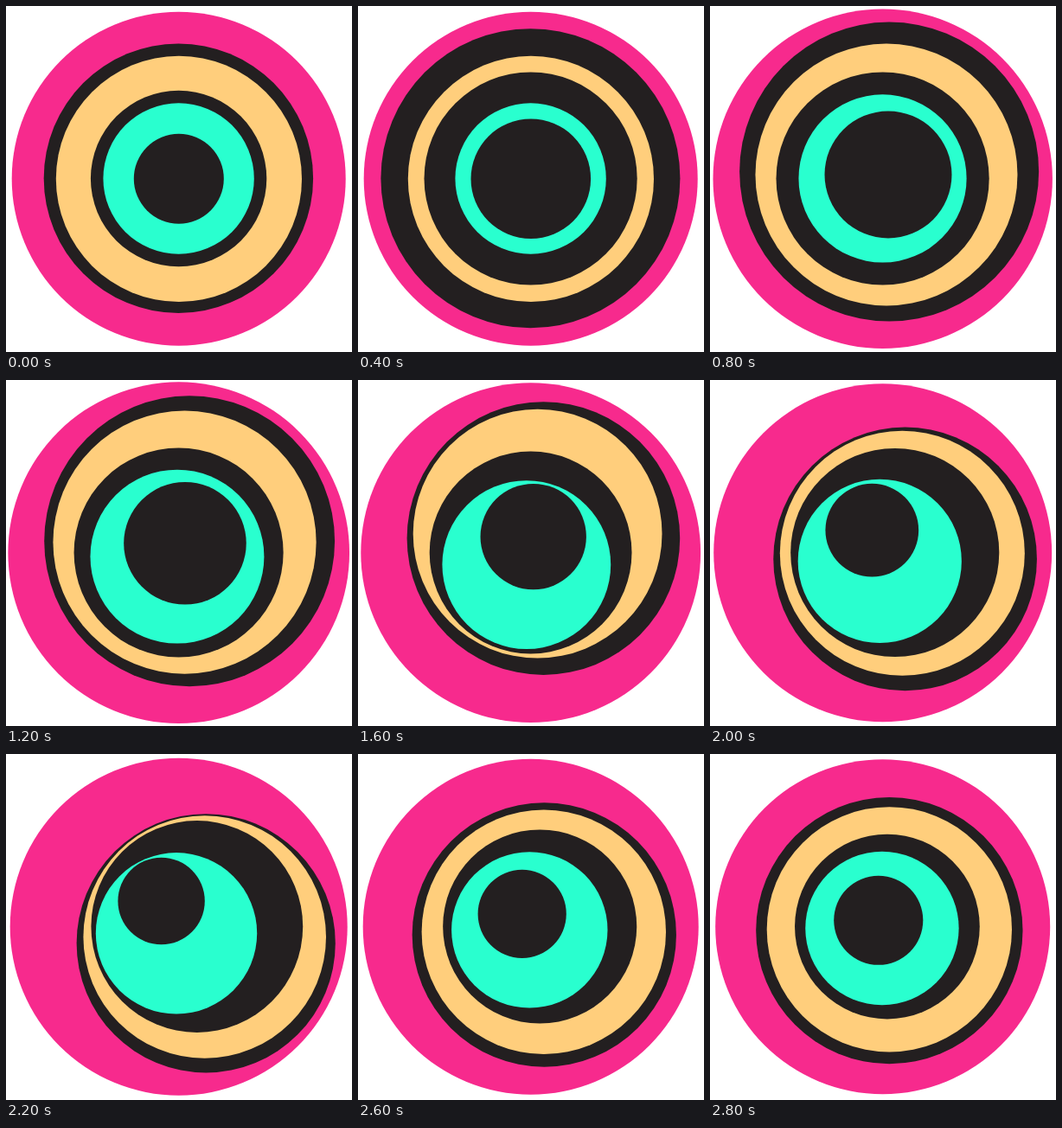
These frames come from a looping animation (400 px wide and 400 px high, 3 s). An HTML page:

```html
<!DOCTYPE html>
<html lang="en">
<head>
<meta charset="utf-8">
<title>Circles</title>
<style>
  html, body { margin: 0; width: 100%; height: 100%; overflow: hidden; background: #fff; }
  svg { display: block; width: 100%; height: 100%; }

  circle { fill: #231f20; animation: 3s infinite; }
  .pink { fill: #f72a8d; animation-name: pink; }
  .yellow { fill: #ffce7c; animation-name: yellow; }
  .teal { fill: #29ffcf; animation-name: teal; }
  .outer { animation-name: outer; }
  .middle { animation-name: middle; }
  .pupil { animation-name: pupil; }

  /* Every segment advances in 200 ms steps. */
  @keyframes pink {
    0% { cx: 199.7px; cy: 199.7px; r: 193px; animation-timing-function: steps(2); }
    13.3333% { cx: 199.7px; cy: 199.7px; r: 193px; animation-timing-function: steps(3); }
    33.3333% { cx: 199.7px; cy: 199.7px; r: 197.8px; animation-timing-function: steps(3); }
    53.3333% { cx: 199.7px; cy: 199.7px; r: 196.4px; animation-timing-function: steps(3); }
    73.3333% { cx: 199.7px; cy: 199.7px; r: 195px; animation-timing-function: steps(4); }
    100% { cx: 199.7px; cy: 199.7px; r: 193px; }
  }
  @keyframes outer {
    0% { cx: 199.4px; cy: 199.2px; r: 155.7px; animation-timing-function: steps(2); }
    13.3333% { cx: 199.4px; cy: 199.2px; r: 173px; animation-timing-function: steps(3); }
    33.3333% { cx: 211px; cy: 187.8px; r: 173px; animation-timing-function: steps(3); }
    53.3333% { cx: 214.4px; cy: 183.1px; r: 157.8px; animation-timing-function: steps(3); }
    73.3333% { cx: 231.2px; cy: 218.8px; r: 149.6px; animation-timing-function: steps(4); }
    100% { cx: 199.4px; cy: 199.2px; r: 155.7px; }
  }
  @keyframes yellow {
    0% { cx: 199.9px; cy: 199.9px; r: 142.1px; animation-timing-function: steps(2); }
    13.3333% { cx: 199.9px; cy: 199.9px; r: 142.1px; animation-timing-function: steps(3); }
    33.3333% { cx: 206px; cy: 192.5px; r: 156.2px; animation-timing-function: steps(3); }
    53.3333% { cx: 207.6px; cy: 177.7px; r: 143.9px; animation-timing-function: steps(3); }
    73.3333% { cx: 229.7px; cy: 211.5px; r: 140.3px; animation-timing-function: steps(4); }
    100% { cx: 199.9px; cy: 199.9px; r: 142.1px; }
  }
  @keyframes middle {
    0% { cx: 199.6px; cy: 199.5px; r: 101.7px; animation-timing-function: steps(2); }
    13.3333% { cx: 199.6px; cy: 199.5px; r: 123.1px; animation-timing-function: steps(3); }
    33.3333% { cx: 199.6px; cy: 199.5px; r: 123.1px; animation-timing-function: steps(3); }
    53.3333% { cx: 199.6px; cy: 199.5px; r: 116.9px; animation-timing-function: steps(3); }
    73.3333% { cx: 220.8px; cy: 199.5px; r: 122.4px; animation-timing-function: steps(4); }
    100% { cx: 199.6px; cy: 199.5px; r: 101.7px; }
  }
  @keyframes teal {
    0% { cx: 199.6px; cy: 199.5px; r: 87.2px; animation-timing-function: steps(2); }
    13.3333% { cx: 199.6px; cy: 199.5px; r: 87.2px; animation-timing-function: steps(3); }
    33.3333% { cx: 199.5px; cy: 199.4px; r: 102px; animation-timing-function: steps(3); }
    53.3333% { cx: 194.8px; cy: 213.6px; r: 97.4px; animation-timing-function: steps(3); }
    73.3333% { cx: 197px; cy: 207.3px; r: 93.2px; animation-timing-function: steps(4); }
    100% { cx: 199.6px; cy: 199.5px; r: 87.2px; }
  }
  @keyframes pupil {
    0% { cx: 199.8px; cy: 199.7px; r: 52px; animation-timing-function: steps(2); }
    13.3333% { cx: 199.8px; cy: 199.7px; r: 69.3px; animation-timing-function: steps(3); }
    33.3333% { cx: 209.1px; cy: 192.6px; r: 75.6px; animation-timing-function: steps(3); }
    53.3333% { cx: 202.7px; cy: 181.1px; r: 61.2px; animation-timing-function: steps(3); }
    73.3333% { cx: 179.6px; cy: 170px; r: 50.2px; animation-timing-function: steps(4); }
    100% { cx: 199.8px; cy: 199.7px; r: 52px; }
  }
</style>
</head>
<body>
<svg viewBox="0 0 400 400">
  <circle class="pink"/>
  <circle class="outer"/>
  <circle class="yellow"/>
  <circle class="middle"/>
  <circle class="teal"/>
  <circle class="pupil"/>
</svg>
</body>
</html>
```
